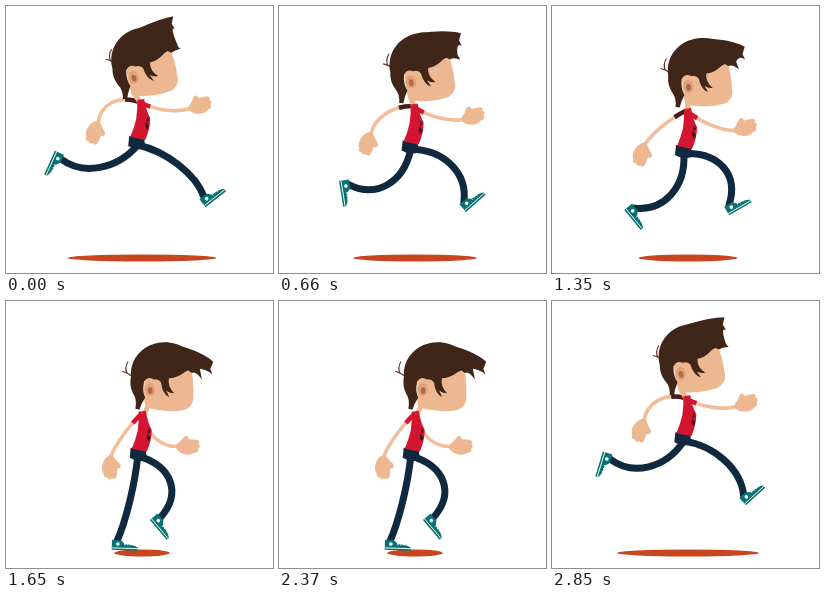
Animation, 267 px wide and 267 px high, one loop 2880 ms. Source, as an HTML page:

```html
<!DOCTYPE html>
<html lang="en">
<head>
<meta charset="utf-8">
<title>Running boy</title>
<style>
  html, body { margin: 0; width: 100%; height: 100%; overflow: hidden; background: #fff; }
  svg { display: block; width: 100%; height: 100%; }
  .leg { fill: none; stroke: #10293f; stroke-width: 7; stroke-linecap: round; }
  .arm { fill: none; stroke: #f2bd9a; stroke-width: 3.6; }
  .sleeve { fill: none; stroke: #d3152f; stroke-width: 4.6; stroke-dasharray: .25 2; }
  .far .sleeve { stroke: #4a1a1c; }
  .skin { fill: #edb891; }
  .hair { fill: #3f2618; }
  .strand { fill: none; stroke: #5a3320; stroke-width: 1.1; }
</style>
</head>
<body>
<svg viewBox="0 0 267 267">
  <defs>
    <g id="shoe">
      <path fill="#0b7274" d="M-5-1 H4 L8 3 Q17 3 21 6 V9 H-5Z"/>
      <path fill="none" stroke="#fff" stroke-width=".9" d="M-5 7H21M8 0V4M11 1V4M14 1V4"/>
      <circle cx="1" cy="3" r="1.8" fill="#fff"/>
    </g>
    <path id="hand" class="skin" d="M-1-2 Q3-5 6-10 Q10-13 11-8 L19-8 Q23-7 21-4 Q24-1 21 1 Q22 5 18 5 Q13 9 7 7 Q2 6 -1 2Z"/>
  </defs>

  <ellipse id="shadow" cx="136" cy="252" ry="3.5" fill="#c8451f"/>

  <g class="far" id="armFar">
    <path class="arm"/><path class="sleeve" pathLength="1"/><use href="#hand"/>
  </g>
  <g id="legFar"><path class="leg"/><use href="#shoe"/></g>
  <g id="legNear"><path class="leg"/><use href="#shoe"/></g>

  <path id="neck" stroke="#edb891" stroke-width="5"/>
  <g id="body">
    <path fill="#10293f" d="M124 139 L139 141 L140 151 Q131 154 123 149Z"/>
    <path fill="#d3152f" d="M132 103 L139 102 Q141 114 145 121 Q145 132 140 143 L125 140 Q129 131 131 122 L132 112Z"/>
    <path fill="#3a1220" d="M142 119 l2 4 -3 2 3 4 -2 4 -2-4 1-4z"/>
  </g>

  <g id="armNear">
    <path class="arm"/><path class="sleeve" pathLength="1"/><use href="#hand"/>
  </g>

  <g id="head">
    <path class="strand" d="M-17-12 Q-22-17 -28-18 M-23-16 Q-26-22 -22-28"/>
    <g id="skull">
      <path class="skin" d="M-5-12 L12-20 H41 Q44-10 43 10 Q42 18 34 21 Q15 24 -4 18 Q-8 10 -5-12Z"/>
      <path class="hair" d="M-19-13 C-20-32 -5-47 15-47 C27-47 36-42 43-33 L46-19 Q38-20 32-15 Q26-11 19-11 Q17-3 24 4 Q19 4 16 1 L19 8 Q12 4 11-7 Q8-11 4-10 Q-2-14 -6-8 Q-8 2 -5 8 Q-9 14 -11 20 L-15 19 Q-13 10 -17 4 Q-21-4 -19-13Z"/>
      <path class="hair" id="tuft"/>
      <ellipse rx="5" ry="6.5" fill="#e0a078"/>
      <ellipse cy="1" rx="2.4" ry="3.4" fill="#b06a48"/>
    </g>
  </g>
</svg>

<script>
  const STRIDE = 720, LOOP = 2880, STEP = 30;
  const { sin, cos, sqrt, hypot, floor, max, PI } = Math;
  const $ = id => document.getElementById(id);

  // Ankle path over one stride: time, x, y, shoe angle
  const anklePath = [
    [0, 198, 191, -38],
    [30, 203, 177, -5],
    [120, 165, 236, 0],
    [210, 111, 240, 2],
    [330, 58, 158, 107],
    [360, 55, 153, 114],
    [570, 154, 217, 50],
    [630, 177, 199, -30]
  ];

  // Smooth closed curve through the path points
  function ankle(time) {
    const t = time % STRIDE, n = anklePath.length;
    const i = anklePath.findLastIndex(p => p[0] <= t);
    const [p, a, b, q] = [-1, 0, 1, 2].map(k => {
      const [when, ...pose] = anklePath[(i + k + n) % n];
      return { when: when + STRIDE * floor((i + k) / n), pose };
    });
    const span = b.when - a.when, u = (t - a.when) / span;
    return a.pose.map((from, j) => {
      const to = b.pose[j];
      const m0 = (to - p.pose[j]) / (b.when - p.when) * span;
      const m1 = (q.pose[j] - from) / (q.when - a.when) * span;
      return from + u * (m0 + u * (3 * (to - from) - 2 * m0 - m1 + u * (2 * (from - to) + m0 + m1)));
    });
  }

  // Wrists hang lowest while the body is low, and linger at both ends of the swing
  function wrist(time) {
    const turn = time / STRIDE * 2 * PI;
    const swing = sin(PI / 2 * cos(turn + 0.28));
    return [138 - 46 * swing, 131.5 - 22 * cos(2 * turn) + 7 * swing, 50 + 64 * swing];
  }

  // A limb of fixed length bows out as its ends come closer; side: 1 knee, -1 elbow
  function limb(id, [x, y], [ex, ey, angle], length, side) {
    const dx = ex - x, dy = ey - y, d = hypot(dx, dy);
    const bow = side * sqrt(max(0, length * length - d * d)) / 2 / d;
    const bend = k => `${x + k * dx + bow * dy} ${y + k * dy - bow * dx}`;
    const group = $(id);
    group.querySelectorAll('path').forEach(p =>
      p.setAttribute('d', `M${x} ${y}C${bend(.32)} ${bend(.76)} ${ex} ${ey}`));
    group.querySelector('use').setAttribute('transform', `translate(${ex} ${ey}) rotate(${angle})`);
  }

  function draw(t) {
    const phase = t / STRIDE * 4 * PI;
    const c = cos(phase), lag = cos(phase - 0.5);
    const headX = 136.5 - 8.8 * c, headY = 80.5 - 9.3 * c;
    const shoulder = [134.2 - 2.3 * c, 104.5 - 9 * c];
    const hip = [131.8, 147.5 - 8.5 * c];

    $('shadow').setAttribute('rx', 49.5 + 25 * c);
    $('body').setAttribute('transform', `translate(${-0.8 * c} ${-9 * c})`);
    $('head').setAttribute('transform', `translate(${headX} ${headY})`);
    $('skull').setAttribute('transform', `rotate(${-6 - 6 * c})`);
    $('neck').setAttribute('d', `M${headX - 1} ${headY + 14}L${shoulder[0] + 2} ${shoulder[1] + 1}`);

    const x = 57 - 6.5 * lag, y = -40 - 13 * lag;
    $('tuft').setAttribute('d', `M16-47Q${x - 14} ${y / 2 - 26} ${x} ${y}L${x - 3} ${y + 7}` +
      `L${x - 1} ${y + 13}Q${x - 6} ${y + 8} 50-20L52 ${-14 - 5 * lag}Q46-18 42-16L38-19L26-24Z`);

    const half = t + STRIDE / 2;
    limb('armFar', shoulder, wrist(t), 54, -1);
    limb('armNear', shoulder, wrist(half), 54, -1);
    limb('legFar', hip, ankle(t), 88, 1);
    limb('legNear', hip, ankle(half), 88, 1);
  }

  const start = performance.now();
  function tick() {
    const t = (performance.now() - start) % LOOP;
    draw(floor(t / STEP) * STEP);
    requestAnimationFrame(tick);
  }
  tick();
</script>
</body>
</html>
```
